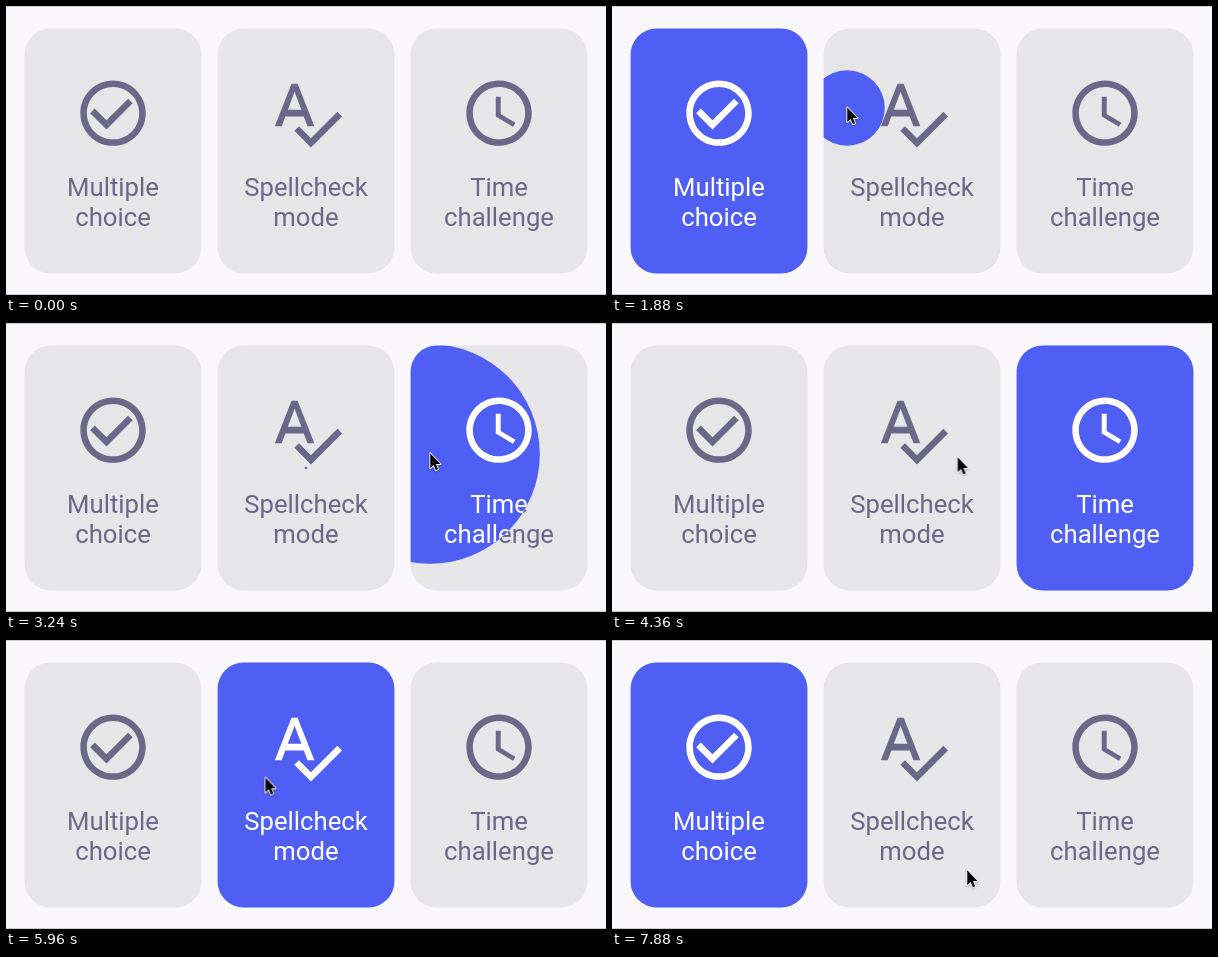
Recreate the animation shown at these times as an HTML page. Size 600 by 289 pixels, loop 7.92 s.

```html
<!DOCTYPE html>
<html lang="en">
<head>
<meta charset="utf-8">
<title>Mode cards</title>
<style>
  html, body { margin: 0; width: 100%; height: 100%; overflow: hidden; }
  body { position: relative; background: #f9f7fb; }

  .rule { position: absolute; left: 0; width: 600px; height: 1px; background: #cbcacd; }
  .rule.top { top: 0; }
  .rule.bottom { top: 288px; }

  .card {
    position: absolute; top: 22px; width: 179px; height: 246px;
    --panel: #e6e5e8; color: #6a6788;
  }
  .face { position: absolute; left: 0; top: 0; width: 179px; height: 246px; }
  rect { fill: var(--panel); }
  .icon { fill: currentColor; }
  text { font: 25.7px Roboto, sans-serif; text-anchor: middle; fill: currentColor; }
  .fill {
    position: absolute; inset: 0; --panel: #4f5ef3; color: #fff;
    animation: 7920ms linear infinite;
  }
  .choice { left: 18px; }
  .spell { left: 211px; }
  .time { left: 404px; }
  .choice .fill { animation-name: choice; }
  .spell .fill { animation-name: spell; }
  .time .fill { animation-name: time; }

  /* Selection grows from the pointer; deselection shrinks to the card centre. */
  @keyframes choice {
    0%, 8.33% { clip-path: circle(0px at 104px 128px); }
    11.7% { clip-path: circle(240px at 104px 128px); }
    11.71%, 23.22% { clip-path: circle(220px at 89px 123px); }
    24.77% { clip-path: circle(0px at 89px 123px); }
    24.78%, 81.33% { clip-path: circle(0px at 148px 120px); }
    84.7%, 100% { clip-path: circle(240px at 148px 120px); }
  }
  @keyframes spell {
    0%, 23.22% { clip-path: circle(0px at 24px 80px); }
    26.59% { clip-path: circle(240px at 24px 80px); }
    26.6%, 39.38% { clip-path: circle(220px at 89px 123px); }
    40.93% { clip-path: circle(0px at 89px 123px); }
    40.94%, 60.09% { clip-path: circle(0px at 134.5px 113px); }
    63.46% { clip-path: circle(240px at 134.5px 113px); }
    63.47%, 81.33% { clip-path: circle(220px at 89px 123px); }
    82.88%, 100% { clip-path: circle(0px at 89px 123px); }
  }
  @keyframes time {
    0%, 39.38% { clip-path: circle(0px at 20px 109px); }
    42.75% { clip-path: circle(240px at 20px 109px); }
    42.76%, 60.09% { clip-path: circle(220px at 89px 123px); }
    61.64%, 100% { clip-path: circle(0px at 89px 123px); }
  }

  .pointer {
    position: absolute; left: 0; top: 0; width: 20px; height: 26px; overflow: visible;
    filter: drop-shadow(0 1px 1px rgba(0, 0, 0, .25));
    animation: move 7920ms ease-in-out infinite, show 7920ms step-end infinite;
  }
  @keyframes show {
    0% { opacity: 0; }
    1.51%, 100% { opacity: 1; }
  }
  @keyframes move {
    0%, 1.51% { transform: translate(150px, 225px); }
    7.58%, 14.14% { transform: translate(122px, 150px); }
    22.73%, 26.77% { transform: translate(235px, 102px); }
    32.83% { transform: translate(399.5px, 127px); animation-timing-function: linear; }
    37.37%, 48.74% { transform: translate(424px, 131px); }
    54.8%, 70.45% { transform: translate(345.5px, 135px); }
    80.3%, 90.15% { transform: translate(166px, 142px); }
    94.95%, 100% { transform: translate(355px, 231px); }
  }
</style>
</head>
<body>
<svg width="0" height="0" style="position:absolute">
  <defs>
    <rect id="panel" x=".6" y=".6" width="176.8" height="244.8" rx="26"/>
    <g id="choice">
      <use href="#panel"/>
      <path class="icon" transform="translate(49.8 45.9) scale(3.27)" d="M16.59 7.58L10 14.17l-3.59-3.58L5 12l5 5 8-8zM12 2C6.48 2 2 6.48 2 12s4.48 10 10 10 10-4.48 10-10S17.52 2 12 2zm0 18c-4.42 0-8-3.58-8-8s3.58-8 8-8 8 3.58 8 8-3.58 8-8 8z"/>
      <text x="89" y="168">Multiple</text>
      <text x="89" y="198">choice</text>
    </g>
    <g id="spell">
      <use href="#panel"/>
      <path class="icon" transform="translate(49.8 45.9) scale(3.27)" d="M12.45 16h2.09L9.43 3H7.57L2.46 16h2.09l1.12-3h5.64l1.14 3zm-6.02-5L8.5 5.48 10.57 11H6.43zm15.16.59l-8.09 8.09L9.83 16l-1.41 1.41 5.09 5.09L23 13l-1.41-1.41z"/>
      <text x="89" y="168">Spellcheck</text>
      <text x="89" y="198">mode</text>
    </g>
    <g id="time">
      <use href="#panel"/>
      <path class="icon" transform="translate(49.8 45.9) scale(3.27)" d="M11.99 2C6.47 2 2 6.48 2 12s4.47 10 9.99 10C17.52 22 22 17.52 22 12S17.52 2 11.99 2zM12 20c-4.42 0-8-3.58-8-8s3.58-8 8-8 8 3.58 8 8-3.58 8-8 8zm.5-13H11v6l5.25 3.15.75-1.23-4.5-2.67z"/>
      <text x="89" y="168">Time</text>
      <text x="89" y="198">challenge</text>
    </g>
  </defs>
</svg>

<div class="rule top"></div>
<div class="rule bottom"></div>

<div class="card choice">
  <svg class="face"><use href="#choice"/></svg>
  <div class="fill"><svg class="face"><use href="#choice"/></svg></div>
</div>
<div class="card spell">
  <svg class="face"><use href="#spell"/></svg>
  <div class="fill"><svg class="face"><use href="#spell"/></svg></div>
</div>
<div class="card time">
  <svg class="face"><use href="#time"/></svg>
  <div class="fill"><svg class="face"><use href="#time"/></svg></div>
</div>

<svg class="pointer">
  <path transform="translate(0 .4) scale(.9)" d="M.3-1.2V15.2L4 11.8 6.5 17.6 9.1 16.5 6.6 10.8H11.6Z" fill="#000" stroke="#fff" stroke-width="2" paint-order="stroke" stroke-linejoin="round"/>
</svg>
</body>
</html>
```
